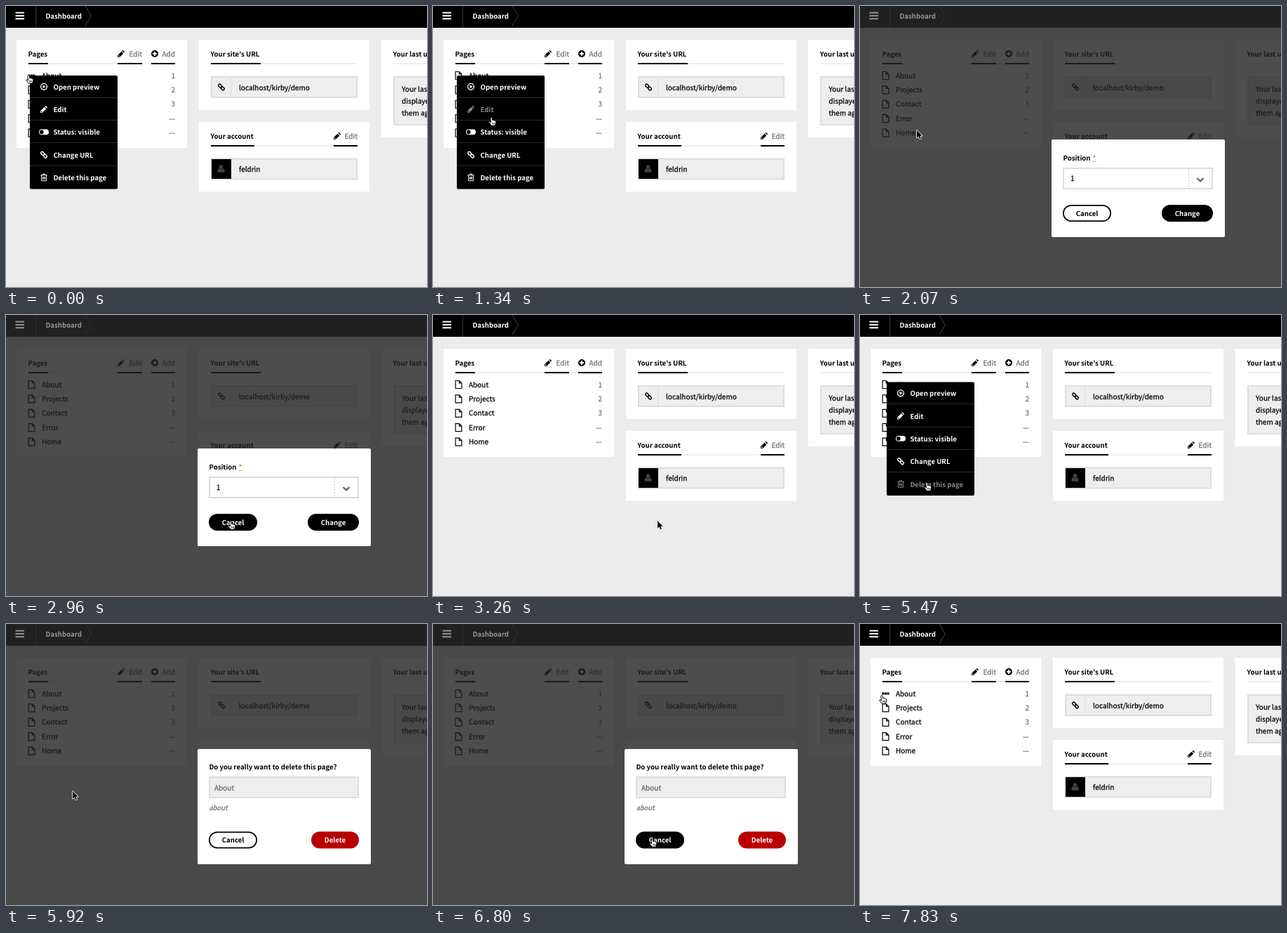
Recreate the animation shown at these times as an HTML page with a canvas. Size 600 by 400 pixels, loop 8000 ms.

```html
<!DOCTYPE html>
<html lang="en">
<head>
<meta charset="utf-8">
<title>Dashboard</title>
<style>
html, body { margin: 0; width: 600px; height: 400px; overflow: hidden; background: #ececec; }
canvas { display: block; }
</style>
</head>
<body>
<canvas id="stage" width="600" height="400"></canvas>
<script>
const ctx = document.getElementById('stage').getContext('2d');
const LOOP = 8000;
const FAMILY = '"Noto Sans CJK JP", "Noto Sans CJK SC", "Noto Sans CJK", "Open Sans", sans-serif';
const GREY = '#707070', LINE = '#ddd', FIELD = '#eee';

// Cursor moves: first step, last step, step count, end point
const MOVES = [
  [150, 450, 3, 80, 146], [890, 890, 1, 82, 146], [1340, 1340, 1, 83, 158],
  [1480, 1780, 3, 81, 177], [2370, 2960, 5, 320, 293], [3410, 4280, 7, 41, 96],
  [4430, 4430, 1, 37, 96], [4880, 5470, 5, 95, 238], [6210, 6800, 5, 312, 305],
  [7250, 7830, 5, 31, 101]
];
const MENUS = [
  { from: 0, to: 1930, x: 34, y: 99 },
  { from: 4730, to: 5770, x: 38, y: 95.5 }
];
const MODALS = [
  { from: 1930, full: 2070, to: 3260, top: 190, bottom: 329, draw: positionForm },
  { from: 5770, full: 5920, to: 7100, top: 178, bottom: 342, draw: deleteForm }
];
const ITEMS = [['play', 'Open preview'], ['pencil', 'Edit'], ['toggle', 'Status: visible'],
  ['link', 'Change URL'], ['trash', 'Delete this page']];
const PAGES = [['About', '1'], ['Projects', '2'], ['Contact', '3'], ['Error', '—'], ['Home', '—']];
const ROW = 20.4, ITEM = 32.3;

const HAND = new Path2D('M3.4 .9C4.3 .2 5.2 .7 5.3 1.7L5.6 4.6C6.4 4.1 7.2 4.4 7.5 5 8.3 4.6 9.1 5 9.3 5.6 10.2 5.4 10.9 6 10.8 7.1L10.3 9.8 9.4 12.3H4.3L2.9 10.3 .8 7.9C.3 7 1.3 6.3 2.2 6.9L3.5 8 2.9 1.8C2.9 1.4 3 1.1 3.4 .9Z');
const CREASES = new Path2D('M5.6 8V10.6M7.1 8V10.6M8.6 8V10.6');
const ARROW = new Path2D('M0 0V10.6L2.5 8.4 4.2 12.2 6 11.4 4.3 7.7H7.6Z');

// Icons are drawn around their centre
const ICONS = {
  pencil: { fill: 'M-5 5V2.3L.6 -3.3 3.3 -.6 -2.3 5ZM-4 2.8V4H-2.8L-2.2 3.4 -3.4 2.2ZM1.4 -4.1 2.1 -4.8Q2.6 -5.2 3.1 -4.8L4.7 -3.2Q5.1 -2.7 4.8 -2.2L4.1 -1.4Z' },
  file: { line: 'M-4.4 -5.5H.9L4.4 -2V5.5H-4.4ZM.9 -5.5V-2H4.4' },
  play: { line: 'M4.4 0A4.4 4.4 0 1 1 -4.4 0A4.4 4.4 0 1 1 4.4 0', fill: 'M-1.5 -2.5 2.7 0 -1.5 2.5Z', width: 1.4 },
  toggle: { fill: 'M-3.2 -3.8H3.2A3.8 3.8 0 0 1 3.2 3.8H-3.2A3.8 3.8 0 0 1 -3.2 -3.8ZM-.4 0A2.8 2.8 0 1 0 -6 0A2.8 2.8 0 1 0 -.4 0Z' },
  link: { line: 'M-1.33 -3.87 .27 -2.27A1.8 1.8 0 0 1 -2.27 .27L-3.87 -1.33A1.8 1.8 0 0 1 -1.33 -3.87ZM1.33 3.87 -.27 2.27A1.8 1.8 0 0 1 2.27 -.27L3.87 1.33A1.8 1.8 0 0 1 1.33 3.87Z', width: 1.5 },
  trash: { line: 'M-4.6 -3.2H4.6M-1.7 -3.2V-4.8H1.7V-3.2M-3.5 -3V4.8H3.5V-3M-1.5 -1V2.8M0 -1V2.8M1.5 -1V2.8', width: 1 },
  plus: { fill: 'M-5 0A5 5 0 1 1 5 0A5 5 0 1 1 -5 0ZM-2.9 -.9V.9H-.9V2.9H.9V.9H2.9V-.9H.9V-2.9H-.9V-.9Z' },
  user: { fill: 'M-2.7 -2.4A2.7 2.9 0 1 1 2.7 -2.4A2.7 2.9 0 1 1 -2.7 -2.4ZM-5 5.2V3.2Q-4.8 .2 -2.5 .1 0 1.9 2.5 .1 4.8 .2 5 3.2V5.2Z' },
  dots: { fill: 'M-5 -1.5H-2V1.5H-5ZM-1.5 -1.5H1.5V1.5H-1.5ZM2 -1.5H5V1.5H2Z' }
};
for (const icon of Object.values(ICONS)) {
  if (icon.fill) icon.fill = new Path2D(icon.fill);
  if (icon.line) icon.line = new Path2D(icon.line);
}

function box(x, y, r, b, color) {
  ctx.fillStyle = color;
  ctx.fillRect(x, y, r - x, b - y);
}

function round(x, y, r, b, radius, color) {
  ctx.beginPath();
  ctx.roundRect(x, y, r - x, b - y, radius);
  ctx.fillStyle = color;
  ctx.fill();
}

function line(points, color, width) {
  ctx.beginPath();
  points.forEach(([x, y]) => ctx.lineTo(x, y));
  ctx.strokeStyle = color;
  ctx.lineWidth = width;
  ctx.stroke();
}

// y is the middle of the capitals; a hairline stroke darkens the regular weight
function text(str, x, y, { color = '#000', bold = false, align = 'left', size = bold ? 9.65 : 10, italic = false } = {}) {
  ctx.font = `${italic ? 'italic ' : ''}${bold ? 600 : 400} ${size}px ${FAMILY}`;
  ctx.textRendering = 'geometricPrecision';
  ctx.textAlign = align;
  ctx.fillStyle = ctx.strokeStyle = color;
  ctx.fillText(str, x, y + 3.6);
  if (bold) return;
  ctx.lineWidth = .25;
  ctx.strokeText(str, x, y + 3.6);
}

function icon(name, x, y, color = '#000') {
  const { fill, line: stroke, width = 1.2 } = ICONS[name];
  ctx.save();
  ctx.translate(x, y);
  ctx.fillStyle = ctx.strokeStyle = color;
  ctx.lineWidth = width;
  if (fill) ctx.fill(fill, 'evenodd');
  if (stroke) ctx.stroke(stroke);
  ctx.restore();
}

function field(x, y, r, b, fill = FIELD) {
  box(x, y, r, b, LINE);
  box(x + 2, y + 2, r - 2, b - 2, fill);
}

function heading(title, x, y, r, end) {
  text(title, x - .5, y, { bold: true });
  box(x, y + 13.5, r, y + 14.5, LINE);
  box(x, y + 13, end, y + 15, '#000');
}

function action(name, label, x, r, y) {
  icon(name, x + 5, y);
  text(label, r, y, { color: GREY, align: 'right' });
  box(x, y + 13, r, y + 15, '#000');
}

function topBar(dim) {
  const ink = dim ? '#959595' : '#fff';
  box(0, 0, 600, 31, dim ? '#212121' : '#000');
  box(42, 0, 43, 31, dim ? '#2f2f2f' : '#333');
  for (let i = 0; i < 3; i++) box(13.5, 8.6 + i * 4.3, 26, 10.6 + i * 4.3, ink);
  text('Dashboard', 56.5, 14.5, { color: ink, bold: true });
  line([[113, 0], [121.5, 14], [113, 28]], dim ? '#333' : '#444', 1);
}

function dashboard(hoverRow) {
  box(0, 0, 600, 400, '#ececec');
  topBar(false);
  [[15, 48, 258, 202], [275, 48, 518, 148], [275, 165, 518, 264.5], [534.5, 48, 600, 187]]
    .forEach(([x, y, r, b]) => box(x, y, r, b, '#fff'));

  heading('Pages', 32, 68, 241, 60);
  action('pencil', 'Edit', 159, 194, 68);
  action('plus', 'Add', 207, 241, 68);
  PAGES.forEach(([name, num], i) => {
    const y = 99 + i * ROW;
    icon(i === hoverRow ? 'dots' : 'file', 36.5, y);
    text(name, 51, y);
    text(num, 241, y, { color: GREY, align: 'right' });
  });

  heading("Your site's URL", 292, 68, 501, 363);
  field(292, 100, 501, 131);
  box(320, 102, 321, 129, LINE);
  icon('link', 307, 115.5);
  text('localhost/kirby/demo', 332, 116);

  heading('Your account', 292, 185, 501, 354);
  action('pencil', 'Edit', 467, 501, 185);
  field(292, 216.5, 501, 247.5);
  box(293, 218, 321, 246, '#000');
  icon('user', 306.5, 231.5, '#444');
  text('feldrin', 332, 232);

  heading('Your last updates', 552, 68, 600, 552);
  field(552, 100, 620, 170);
  ['Your last updates will be', 'displayed here to open', 'them again quickly']
    .forEach((str, i) => text(str, 564, 118.5 + i * 17));
}

function menu({ x, y }, hover) {
  ctx.save();
  ctx.shadowColor = 'rgba(0,0,0,.15)';
  ctx.shadowBlur = 2;
  round(x, y, x + 125, y + 5 * ITEM, 2, '#000');
  ctx.restore();
  ITEMS.forEach(([name, label], i) => {
    const top = y + i * ITEM, color = i === hover ? '#888' : '#fff';
    if (i) box(x, Math.floor(top) - 1, x + 125, Math.floor(top), '#2c2c2c');
    icon(name, x + 20, top + 15.8, color);
    text(label, x + 33.5, top + 16.2, { color, bold: true });
  });
}

function button(label, x, r, y, color, outlined) {
  round(x, y, r, y + 24, 12, color);
  if (outlined) round(x + 1.7, y + 1.7, r - 1.7, y + 22.3, 10.3, '#fff');
  text(label, (x + r) / 2, y + 12, { color: outlined ? color : '#fff', bold: true, align: 'center' });
}

function positionForm(hot) {
  text('Position', 289.5, 216, { bold: true });
  text('*', 331.5, 216.5, { bold: true, color: '#8dae28' });
  box(331, 221, 337, 222, '#b5cc72');
  field(289, 230, 503, 261, '#fff');
  text('1', 300, 245.5);
  ctx.setLineDash([2, 2]);
  line([[468.5, 232], [468.5, 259]], '#ccc', 1);
  ctx.setLineDash([]);
  line([[480.5, 245], [485, 249.3], [489.5, 245]], '#666', 2.4);
  button('Cancel', 289, 358, 283, '#000', !hot);
  button('Change', 430, 503, 283, '#000');
}

function deleteForm(hot) {
  text('Do you really want to delete this page?', 289.5, 203.5, { bold: true });
  field(289, 217, 503, 248);
  text('About', 297, 233, { color: '#666' });
  text('about', 289.5, 261.5, { color: GREY, italic: true, size: 9.4 });
  button('Cancel', 289, 358, 295.5, '#000', !hot);
  button('Delete', 435, 503, 295.5, '#b80000');
}

function modal(m, t, x, y) {
  ctx.globalAlpha = t < m.full ? .5 : 1;
  box(0, 31, 600, 400, 'rgba(33,33,33,.8)');
  topBar(true);
  round(273, m.top, 520, m.bottom, 2, '#fff');
  m.draw(overCancel(m, x, y));
  ctx.globalAlpha = 1;
}

function overCancel(m, x, y) {
  return x > 289 && x < 358 && y > m.bottom - 47 && y < m.bottom - 22;
}

function pointer(x, y, hand) {
  ctx.save();
  ctx.lineJoin = 'round';
  if (hand) {
    ctx.translate(x - 4, y);
    ctx.fillStyle = '#fff';
    ctx.strokeStyle = '#000';
    ctx.lineWidth = 1;
    ctx.fill(HAND);
    ctx.stroke(HAND);
    ctx.lineWidth = .7;
    ctx.stroke(CREASES);
  } else {
    ctx.translate(x, y);
    ctx.strokeStyle = '#fff';
    ctx.lineWidth = 1.6;
    ctx.stroke(ARROW);
    ctx.fillStyle = '#000';
    ctx.fill(ARROW);
  }
  ctx.restore();
}

function cursorAt(t) {
  let x = 32, y = 98;
  for (const [from, to, steps, ex, ey] of MOVES) {
    if (t < from) break;
    const gap = steps > 1 ? (to - from) / (steps - 1) : 1;
    const p = Math.min(steps, Math.floor((t - from) / gap + 1.02)) / steps;
    const e = p * p * (3 - 2 * p);
    x += (ex - x) * e;
    y += (ey - y) * e;
  }
  return [x, y];
}

function render(t) {
  const [x, y] = cursorAt(t);
  const active = list => list.find(o => t >= o.from && t < o.to);
  const open = active(MENUS), dialog = active(MODALS);
  const inMenu = open && x > open.x && y > open.y;
  const row = Math.floor((y + 3 - 89) / ROW);
  const onRow = !dialog && !inMenu && x > 25 && x < 241 && row >= 0 && row < 5;

  dashboard(onRow && x < 48 ? row : -1);
  if (open) menu(open, inMenu ? Math.floor((y - open.y) / ITEM) : -1);
  if (dialog) modal(dialog, t, x, y);
  pointer(x, y, inMenu || onRow || (dialog && overCancel(dialog, x, y)));
}

function tick(now) {
  render(now % LOOP);
  requestAnimationFrame(tick);
}
requestAnimationFrame(tick);
</script>
</body>
</html>
```
